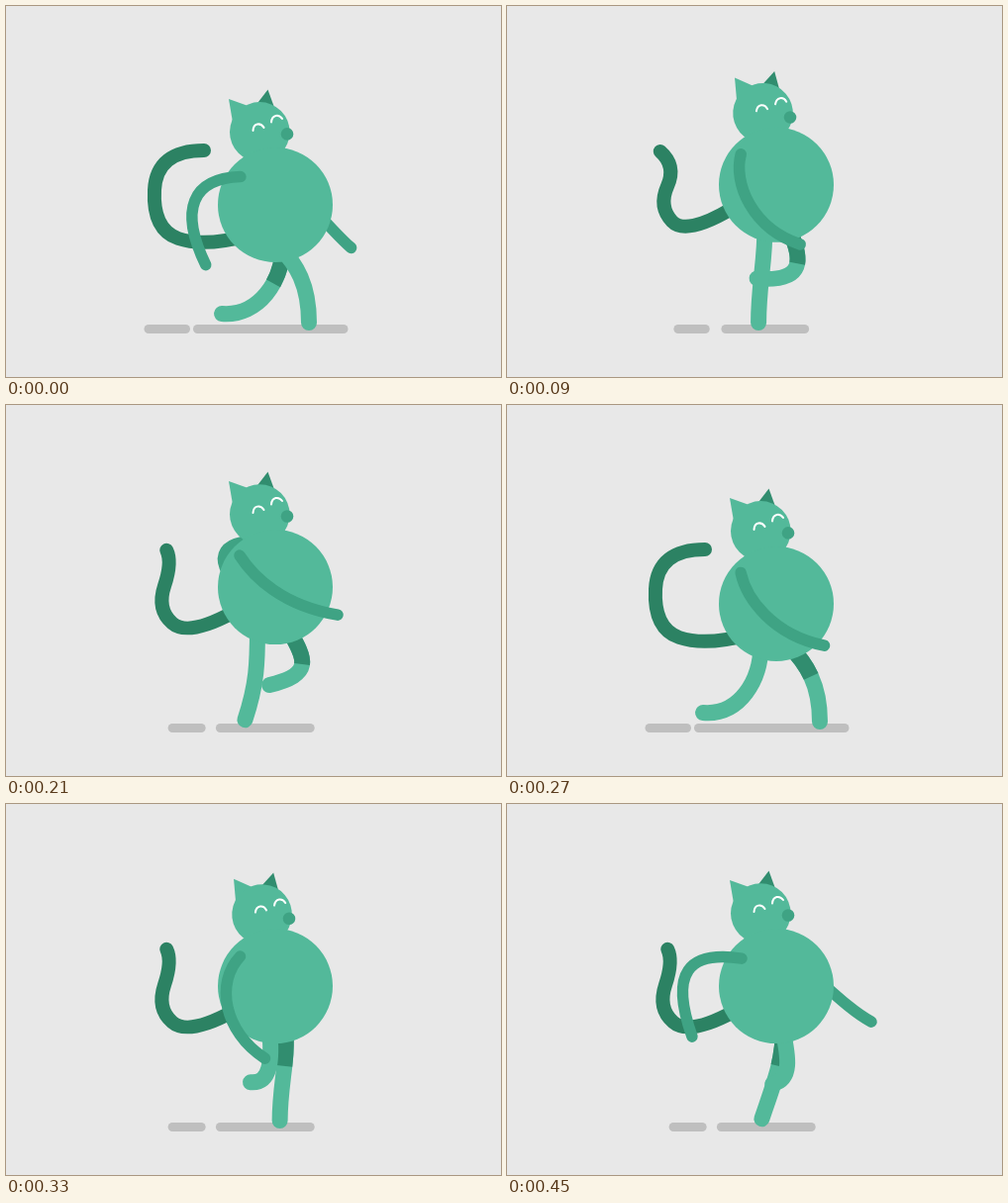
An HTML page with a canvas that plays this animation: 500x375 px, repeating every 480 ms.

```html
<!DOCTYPE html>
<html lang="en">
<head>
<meta charset="utf-8">
<title>Strolling cat</title>
<style>
  html, body { margin: 0; height: 100%; overflow: hidden; background: #e8e8e8; }
  canvas { display: block; }
</style>
</head>
<body>
<canvas id="stage" width="500" height="375"></canvas>
<script>
const ctx = document.getElementById('stage').getContext('2d');
const STEP = 30, STEPS = 16, CYCLE = 16, STRIDE = 8;
const LIGHT = '#53b99a', MID = '#3fa384', DARK = '#318d6f', TAIL = '#2c8263';
const GROUND = '#bfbfbf', SKY = '#e8e8e8';
const BODY_X = 272, FLOOR = 320, SHIN = 38;

const NEAR_LEG = { hip: 266, sway: 12, foot: 252, stride: 54, shift: 7, knee: 4, shin: -22 };
const FAR_LEG = { hip: 282, sway: 3, foot: 267, stride: 49, shift: -13, knee: 17, shin: 11 };

// Two control points and the hand, measured from the shoulder.
const NEAR_ARM = {
  back: [-54, -8, -73, 14, -50, 79],
  middle: [-25, 26, -17, 76, 25, 103],
  front: [14, 22, 44, 51, 99, 60]
};
const FAR_ARM = {
  back: [-45, -7, -64, 13, -26, 50],
  middle: [-4, 35, 4, 60, 19, 95],
  front: [39, 25, 72, 65, 102, 81]
};

// Tail outline corners from tip to root.
const TAIL_LOW = [[200, 146], [152, 146], [148, 226], [200, 244], [245, 232]];
const TAIL_HIGH = [[153, 147], [172, 162], [153, 202], [180, 232], [226, 204]];

const mix = (a, b, u) => a + (b - a) * u;
const clamp = (v, lo, hi) => Math.max(lo, Math.min(hi, v));

// Signed distance from the middle of a stride: 1 at its start, -1 at its end.
function reachAt(beat) {
  const r = 1 - beat / 4;
  return Math.sign(r) * Math.abs(r) ** 2.35;
}

// Pendulum that rests a little at both ends.
function swingAt(phase) {
  const s = Math.sin((phase - 2) / 8 * Math.PI);
  return s * (1.27 - .27 * s * s);
}

function line(color, width, trace, cap = 'round') {
  ctx.beginPath();
  trace();
  ctx.strokeStyle = color;
  ctx.lineWidth = width;
  ctx.lineCap = cap;
  ctx.stroke();
}

function curve(color, width, points, cap) {
  line(color, width, () => {
    ctx.moveTo(points[0], points[1]);
    ctx.bezierCurveTo(...points.slice(2));
  }, cap);
}

function disc(x, y, r, color) {
  ctx.beginPath();
  ctx.arc(x, y, r, 0, Math.PI * 2);
  ctx.fillStyle = color;
  ctx.fill();
}

function triangle(color, ...p) {
  ctx.beginPath();
  ctx.moveTo(p[0], p[1]);
  ctx.lineTo(p[2], p[3]);
  ctx.lineTo(p[4], p[5]);
  ctx.fillStyle = color;
  ctx.fill();
}

function bar(left, right) {
  line(GROUND, 9, () => {
    ctx.moveTo(left + 4.5, 326.5);
    ctx.lineTo(right - 4.5, 326.5);
  });
}

function drawTail(drop) {
  const p = TAIL_HIGH.map(([x, y], i) => [mix(x, TAIL_LOW[i][0], drop), mix(y, TAIL_LOW[i][1], drop)]);
  const last = p.length - 1;
  line(TAIL, 14, () => {
    ctx.moveTo(...p[0]);
    for (let i = 1; i < last; i++) {
      const next = p[i + 1];
      const end = i === last - 1 ? next : [(p[i][0] + next[0]) / 2, (p[i][1] + next[1]) / 2];
      ctx.quadraticCurveTo(...p[i], ...end);
    }
  });
}

function drawArm({ back, middle, front }, swing, x, y) {
  const points = middle.map((m, i) => {
    const lean = (front[i] - back[i]) / 2, bend = (front[i] + back[i]) / 2 - m;
    return m + lean * swing + bend * swing * swing + (i % 2 ? y : x);
  });
  curve(MID, 11.5, [x, y, ...points]);
}

// The first half of a leg's cycle stands on the floor, the second half swings.
function legPoints(leg, phase, bodyY) {
  const swinging = phase % CYCLE >= STRIDE;
  const reach = reachAt(phase % STRIDE);
  const step = swinging ? -reach : reach;
  const ahead = Math.max(0, step), behind = Math.max(0, -step);
  const raise = swinging ? 1 - Math.abs(step) : 0;

  const hipX = leg.hip - leg.sway * swingAt(phase), hipY = bodyY + 42;
  const kneeX = hipX + 18 * ahead + leg.knee * raise, kneeY = hipY + 34 - 16 * ahead;
  const footX = leg.foot + leg.stride * step + leg.shift * raise;
  const footY = FLOOR - 9 * behind - 46 * raise;
  const angle = 1.65 * (behind + raise), shin = SHIN + leg.shin * raise;
  return [
    hipX, hipY, kneeX, kneeY,
    footX + shin * Math.sin(angle), footY - shin * Math.cos(angle), footX, footY
  ];
}

function drawHead(bodyY, tilt) {
  ctx.save();
  ctx.translate(244, bodyY - 45);
  ctx.rotate(tilt * .08);
  ctx.translate(-244, -155.6);
  triangle(DARK, 264.5, 84, 253, 99, 271, 102);
  triangle(LIGHT, 225, 93.5, 229.5, 120, 246, 101);
  disc(256.3, 127, 30.3, LIGHT);
  disc(284, 129, 6.3, MID);
  curve('#fff', 2, [249.5, 125.5, 250, 118, 257, 117, 260.5, 122.5]);
  curve('#fff', 2, [268, 117, 268.5, 109.5, 275.5, 108.5, 279, 113.5]);
  ctx.restore();
}

function draw(phase) {
  const beat = phase % STRIDE;
  const drop = Math.abs(reachAt(beat));
  const bodyY = 180 + 21 * drop;
  const swing = swingAt(phase);
  const tilt = clamp(Math.min(beat, 6 - beat) / 2, 0, 1);

  ctx.fillStyle = SKY;
  ctx.fillRect(0, 0, 500, 375);
  bar(mix(169.5, 139.5, drop), mix(205.5, 186, drop));
  bar(mix(217.5, 189, drop), mix(303.5, 345.5, drop));

  drawTail(drop);
  drawArm(FAR_ARM, -swing, 266, bodyY - 45);

  const farLeg = legPoints(FAR_LEG, phase + STRIDE, bodyY);
  curve(LIGHT, 16, farLeg);
  ctx.setLineDash([39, 999]);
  curve(DARK, 16, farLeg, 'butt');
  ctx.setLineDash([]);
  curve(LIGHT, 16, legPoints(NEAR_LEG, phase, bodyY));

  drawHead(bodyY, tilt);
  disc(BODY_X, bodyY, 58, LIGHT);
  drawArm(NEAR_ARM, swing, 236.5 - swing / 2, bodyY - 30 - 2 * swing);
}

function frame(elapsed) {
  const step = Math.floor(elapsed / STEP) % STEPS;
  // The walk holds one pose at the top of the first stride.
  draw(step > 4 ? step - 1 : step);
  requestAnimationFrame(() => frame(performance.now() - start));
}

const start = performance.now();
frame(0);
</script>
</body>
</html>
```
